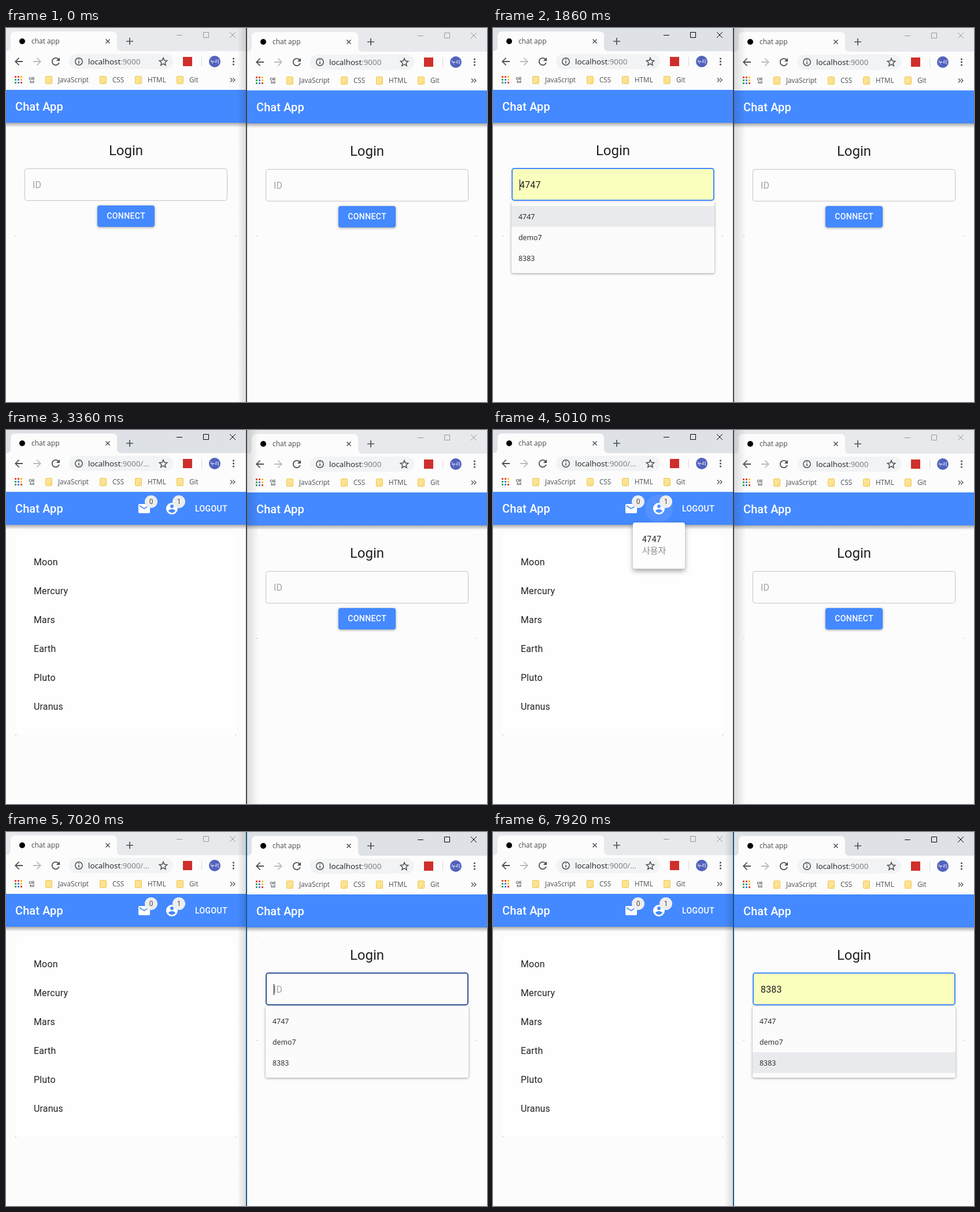
Recreate the animation shown at these times as an HTML page. Size 832 by 647 pixels, loop 8000 ms.

```html
<!DOCTYPE html>
<html lang="en">
<head>
<meta charset="utf-8">
<title>Chat app login</title>
<style>
html, body { margin: 0; width: 100%; height: 100%; overflow: hidden; background: #fcfcfc; }
svg { display: block; }
text { font-family: Roboto, sans-serif; fill: #212121; white-space: pre; }
.ui { font-family: 'Open Sans', 'Noto Sans CJK KR', sans-serif; }
.bm { font-size: 11.7px; fill: #4c5054; }
.med { font-weight: 500; }
.body { font-size: 16px; letter-spacing: .15px; }
.btn { font-size: 14px; font-weight: 500; letter-spacing: .4px; fill: #fff; }
.line { fill: none; stroke: #4d5156; }
.raised { filter: drop-shadow(0 1px 2px rgba(0,0,0,.38)); }
.menu { filter: drop-shadow(0 4px 4px rgba(0,0,0,.36)); }
</style>
</head>
<body>
<svg id="stage" width="832" height="647" viewBox="0 0 832 647"></svg>
<script>
const LOOP = 8000, BLUE = '#4489ff';
const USERS = ['4747', 'demo7', '8383'];
const ROOMS = ['Moon', 'Mercury', 'Mars', 'Earth', 'Pluto', 'Uranus'];
const ICON = {
  back: 'M20 11H7.8l5.6-5.6L12 4l-8 8 8 8 1.4-1.4L7.8 13H20z',
  reload: 'M17.65 6.35C16.2 4.9 14.2 4 12 4c-4.4 0-8 3.6-8 8s3.6 8 8 8c3.7 0 6.8-2.5 7.7-6h-2.1c-.8 2.3-3 4-5.6 4-3.3 0-6-2.7-6-6s2.7-6 6-6c1.7 0 3.1.7 4.2 1.8L13 11h7V4z',
  star: 'M12 3.5l2.5 5.9 6.4.6-4.8 4.2 1.4 6.3-5.5-3.3-5.5 3.3 1.4-6.3L3.1 10l6.4-.6z',
  mail: 'M20 4H4c-1.1 0-2 .9-2 2v12c0 1.1.9 2 2 2h16c1.1 0 2-.9 2-2V6c0-1.1-.9-2-2-2zm0 4l-8 5-8-5V6l8 5 8-5z',
  user: 'M12 2C6.5 2 2 6.5 2 12s4.5 10 10 10 10-4.5 10-10S17.5 2 12 2zm0 3c1.7 0 3 1.3 3 3s-1.3 3-3 3-3-1.3-3-3 1.3-3 3-3zm0 14.2c-2.5 0-4.7-1.3-6-3.2 0-2 4-3.1 6-3.1s6 1.1 6 3.1c-1.3 1.9-3.5 3.2-6 3.2z'
};

const rect = (x, y, w, h, fill, extra = '') =>
  `<rect x="${x}" y="${y}" width="${w}" height="${h}" fill="${fill}" ${extra}/>`;
const dot = (x, y, r, fill, extra = '') => `<circle cx="${x}" cy="${y}" r="${r}" fill="${fill}" ${extra}/>`;
const label = (x, y, str, cls, extra = '') => `<text x="${x}" y="${y}" class="${cls}" ${extra}>${str}</text>`;
const line = (d, extra = '') => `<path d="${d}" class="line" ${extra}/>`;
const icon = (name, cx, cy, sx, sy = sx, extra = 'fill="#4d5156"') =>
  `<path d="${ICON[name]}" transform="translate(${cx} ${cy}) scale(${sx} ${sy}) translate(-12 -12)" ${extra}/>`;
const folder = x => rect(x + .5, 83.5, 11, 13, '#fde293', 'rx="1" stroke="#ecc94b"') +
  `<path d="M${x + 8} 97v-4h4" fill="#fff3c4" stroke="#ecc94b"/>`;
const bookmark = (x, name) => folder(x) + label(x + 22, 94, name, 'ui bm');
const corners = bottom => [17, 397].map(x =>
  rect(x, 180, 1, 1, '#ccc') + rect(x - 1, bottom, 2, 1, '#b8b8b8')).join('');

function browser() {
  const hues = ['#ea4335', '#ea4335', '#fbbc05', '#34a853', '#4285f4', '#fbbc05', '#34a853', '#4285f4', '#ea4335'];
  const apps = hues.map((c, i) => rect(15 + i % 3 * 5, 83 + (i / 3 | 0) * 5, 3, 3, c)).join('');
  return rect(0, -1, 415, 41, '#dee1e6', 'class="bar"') +
    '<path d="M0 40q8 0 8-8V14q0-8 8-8h168q8 0 8 8v18q0 8 8 8z" fill="#fcfcfc"/>' +
    dot(28, 23, 5, '#000') + label(44, 27, 'chat app', 'ui', 'font-size="12" style="fill:#45494d"') +
    line('M172.500 19.500l7 7m0-7l-7 7', 'stroke-width="1.5"') + line('M208 23h12m-6-6v12', 'stroke-width="1.7"') +
    '<path class="ctl" d="M295 12.500h10M341.500 7.500h9v9h-9zM387 7l10 10m0-10l-10 10" fill="none" stroke="#000"/>' +
    rect(0, 40, 415, 67, '#fcfcfc') +
    icon('back', 22, 58, .88) + icon('back', 54, 58, -.88, .88, 'fill="#b9bcbf"') + icon('reload', 86, 58, .88) +
    rect(109, 45, 180, 26, '#f1f3f4', 'rx="13"') +
    line('M126 57v4.500m0-8v1.700', 'stroke-width="1.6"') + dot(126, 58, 6.2, 'none', 'stroke="#4d5156" stroke-width="1.5"') +
    '<text x="142" y="63" class="ui" font-size="13.4">localhost<tspan class="port" fill="#777b80">:9000</tspan></text>' +
    icon('star', 272, 58, .75, .75, 'fill="none" stroke="#4d5156" stroke-width="2"') +
    rect(306, 50, 16, 16, '#cf2f2a') + rect(338, 50, 1, 16, '#d5d8db') +
    dot(361, 58, 10, '#5262bd') + label(361, 61, '누리', 'ui', 'font-size="8.5" text-anchor="middle" style="fill:#fff"') +
    [53, 58, 63].map(y => dot(393.5, y, 1.6, '#4d5156')).join('') +
    apps + label(39, 94, '앱', 'ui bm') +
    bookmark(68, 'JavaScript') + bookmark(162, 'CSS') + bookmark(223, 'HTML') + bookmark(295, 'Git') +
    line('M388 86.500l3.500 3.500-3.500 3.500m4.500-7l3.500 3.500-3.500 3.500', 'stroke-width="1.3"');
}

function loginForm() {
  const rows = USERS.map((u, i) =>
    rect(32, 308 + i * 36, 351, 36, '#e8eaed', 'class="row"') +
    label(44, 331 + i * 36, u, 'ui', 'font-size="12.400"')).join('');
  return `<g class="login">${corners(359)}` +
    label(207.5, 220, 'Login', '', 'font-size="24" text-anchor="middle"') +
    '<rect class="field" rx="4"/>' + label(46, 277, 'ID', 'body value') +
    rect(46, 262, 1, 19, '#000', 'class="caret"') +
    `<g class="raised">${rect(158, 307, 99, 37, BLUE, 'rx="4" class="press"')}</g>` +
    '<g clip-path="url(#face)">' + dot(207, 326, 0, '#fff', 'class="wave"') + '</g>' +
    label(207.7, 330, 'CONNECT', 'btn', 'text-anchor="middle"') +
    `<g class="list"><g class="raised">${rect(32, 301, 351, 123, '#fbfbfb', 'rx="3"')}</g>${rows}</g></g>`;
}

function chatPage() {
  const badge = (x, n) => dot(x, 124, 11, '#eceef0') +
    label(x, 128, n, '', 'font-size="12" text-anchor="middle" style="fill:#5c4636"');
  return '<g class="chat">' + rect(16, 180, 383, 348, '#fefefe', 'rx="4"') + corners(527) +
    ROOMS.map((r, i) => label(48, 234 + i * 50, r, 'body')).join('') +
    dot(287, 136, 24, '#fff', 'class="halo"') + dot(287, 136, 0, '#fff', 'class="ring"') +
    icon('mail', 239, 136, 1, 1, 'fill="#fff"') + icon('user', 287, 136, 1, 1, 'fill="#fff"') +
    badge(251, 0) + badge(299, 1) + label(327, 141, 'LOGOUT', 'btn') +
    '<g class="pop"><g class="menu">' + rect(242, 160, 90, 80, '#fdfdfd', 'rx="4"') + '</g>' +
    label(258, 194, USERS[0], '', 'font-size="14" letter-spacing=".5"') +
    label(258, 214, '사용자', 'ui', 'font-size="15" style="fill:#8a8a8a"') + '</g></g>';
}

const win = (x, y) => `<g class="win" transform="translate(${x} ${y})">` +
  browser() + rect(0, 164, 415, 8, 'url(#drop)') + rect(0, 107, 415, 57, BLUE) +
  label(16, 143, 'Chat App', 'med', 'font-size="20" letter-spacing=".1" style="fill:#fff"') +
  loginForm() + chatPage() + '</g>';

const fade = (id, dir, a, b) => `<linearGradient id="${id}" ${dir}>` +
  `<stop stop-opacity="${a}"/><stop offset="1" stop-opacity="${b}"/></linearGradient>`;
const stage = document.getElementById('stage');
stage.innerHTML = '<defs>' + fade('drop', 'x2="0" y2="1"', .32, 0) + fade('toLeft', '', 0, .13) + fade('toRight', '', .13, 0) +
  '<clipPath id="face"><rect x="158" y="307" width="99" height="37" rx="4"/></clipPath></defs>' +
  rect(0, 0, 832, 647, '#fcfcfc') + win(0, 0) + win(417, 1) +
  rect(400, 0, 15, 647, 'url(#toLeft)', 'id="shadeL"') + rect(417, 0, 20, 647, 'url(#toRight)', 'id="shadeR"') +
  rect(415, 0, 2, 647, '#444', 'id="edge"');

const [left, right] = document.querySelectorAll('.win');
const set = (el, attrs) => { for (const k in attrs) el.setAttribute(k, attrs[k]); };
const show = (el, on) => { el.style.display = on ? '' : 'none'; };
const within = (t, a, b) => t >= a && t < b;
const ramp = (t, a, b) => Math.sin(Math.min(1, Math.max(0, (t - a) / (b - a))) * Math.PI / 2);
const mix = (a, b, k) => a.map((v, i) => v + (b[i] - v) * k);
const rgb = c => `rgb(${c.map(Math.round)})`;

function drawWindow(el, s) {
  const $ = sel => el.querySelector(sel);
  set($('.bar'), { fill: s.active ? '#dee1e6' : '#e7e9ec' });
  set($('.ctl'), { stroke: s.active ? '#000' : '#999' });
  show($('.chat'), s.chat);
  show($('.login'), !s.chat);
  $('.port').textContent = s.chat ? ':9000/...' : ':9000';
  const edge = mix(mix([196, 196, 196], [33, 33, 33], s.hover), [68, 137, 255], s.focus);
  const w = s.thick ? 2 : 1, top = s.focus > 0 ? 242 : 243;
  set($('.field'), {
    x: 32 + w / 2, y: top + w / 2, width: 351 - w, height: 299 - top - w,
    fill: s.value ? '#faffbd' : '#fcfcfc', stroke: rgb(edge), 'stroke-width': w
  });
  $('.value').textContent = s.value || 'ID';
  $('.value').style.fill = s.value ? '#212121' : '#a4a4a4';
  show($('.caret'), s.caret);
  set($('.caret'), { x: s.caret });
  show($('.list'), s.open);
  el.querySelectorAll('.row').forEach((r, i) => show(r, i === s.row));
}

function drawLeft(t) {
  const away = ramp(t, 2940, 3060);
  drawWindow(left, {
    active: within(t, 1020, 6960), chat: t >= 3210,
    hover: ramp(t, 720, 900) * (1 - ramp(t, 2550, 2700)),
    focus: ramp(t, 1020, 1200) * (1 - away), thick: within(t, 1110, 3000),
    value: t >= 1860 ? USERS[0] : '',
    open: within(t, 1080, 2550), row: t >= 1860 ? 0 : -1,
    caret: within(t, 1050, 1560) || within(t, 1860, 2340) ? 46 : within(t, 2550, 2940) ? 82 : 0
  });
  const $ = sel => left.querySelector(sel);
  set($('.press'), { fill: rgb(mix([68, 137, 255], [48, 105, 220], away)) });
  set($('.wave'), { r: 60 * ramp(t, 3060, 3360), opacity: t > 3060 ? .25 : 0 });
  set($('.halo'), { opacity: .08 * ramp(t, 3810, 4080) * (1 - ramp(t, 6510, 6660)) });
  set($('.ring'), { r: 24 * ramp(t, 4350, 4560), opacity: .25 * (1 - ramp(t, 4530, 4770)) });
  const grow = ramp(t, 4410, 4680), gone = ramp(t, 5850, 6120), k = grow * (1 - gone);
  show($('.pop'), k > 0);
  set($('.pop'), {
    opacity: k,
    transform: `translate(287 160) scale(${.75 + .25 * k} ${.5625 + .4375 * k}) translate(-287 -160)`
  });
}

function drawRight(t) {
  const row = t < 7410 ? -1 : t < 7530 ? 0 : t < 7710 ? 1 : 2;
  drawWindow(right, {
    active: t >= 6960, chat: false,
    hover: ramp(t, 6570, 6780), focus: ramp(t, 6960, 7140), thick: t >= 6990,
    value: USERS[row] || '', open: t >= 7020, row,
    caret: within(t, 6990, 7920) ? 46 : 0
  });
}

function draw(t) {
  const front = within(t, 1020, 6960);
  drawLeft(t);
  drawRight(t);
  show(document.getElementById('shadeL'), !front);
  show(document.getElementById('shadeR'), front);
  set(document.getElementById('edge'), { fill: t >= 6960 ? '#17588c' : '#444' });
}

const start = performance.now();
function tick() {
  draw((performance.now() - start) % LOOP);
  requestAnimationFrame(tick);
}
tick();
</script>
</body>
</html>
```
